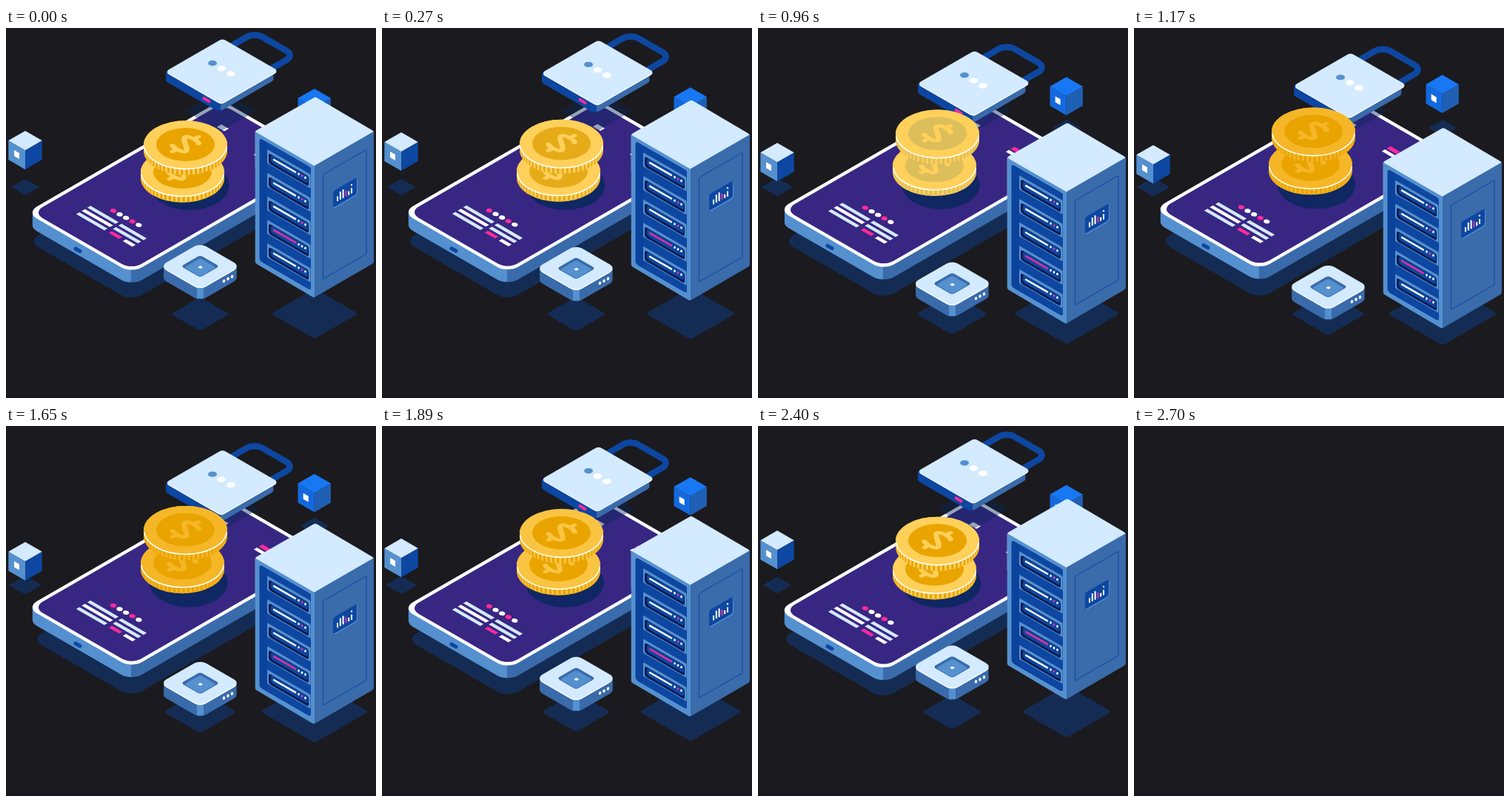
Write an HTML page with a canvas that moves like this. It is 500 by 500 pixels and loops after 2730 ms.

```html
<!DOCTYPE html>
<html lang="en">
<head>
<meta charset="utf-8">
<title>Isometric payment devices</title>
<style>
  html, body { margin: 0; width: 100%; height: 100%; overflow: hidden; background: #1b1a1e; }
  canvas { display: block; }
</style>
</head>
<body>
<canvas id="stage" width="500" height="500"></canvas>
<script>
const ctx = document.getElementById('stage').getContext('2d');
const LOOP = 2730, STEP = 30, SWING = 2700;
const COS = Math.cos(Math.PI / 6), SLOPE = Math.tan(Math.PI / 6);
const BG = '#1b1a1e', PALE = '#d3eaff', SKY = '#5590cf', STEEL = '#3a6bab', DEEP = '#0d47a1',
      NAVY = '#071b52', SHADE = '#142c54', PINK = '#f92c9c', PURPLE = '#382683', WHITE = '#fff';

const mix = (a, b, k) => a + (b - a) * k;
const clamp = v => Math.min(1, Math.max(0, v));
const wave = t => (1 - Math.cos(2 * Math.PI * t / SWING)) / 2;

function fill(color) {
  ctx.fillStyle = color;
  ctx.fill();
}

function stroke(color, width, cap = 'butt') {
  ctx.strokeStyle = color;
  ctx.lineWidth = width;
  ctx.lineCap = cap;
  ctx.stroke();
}

function line(x0, y0, x1, y1, color, width, cap) {
  ctx.beginPath();
  ctx.moveTo(x0, y0);
  ctx.lineTo(x1, y1);
  stroke(color, width, cap);
}

function oval(x, y, rx, ry, color, turn = 0) {
  ctx.beginPath();
  ctx.ellipse(x, y, rx, ry, turn, 0, 7);
  fill(color);
}

function lifted(dy, draw) {
  ctx.save();
  ctx.translate(0, dy);
  draw();
  ctx.restore();
}

// Rectangle lying on the ground plane; (x, y) is its left corner
function slabPath(x, y, w, h, r) {
  ctx.save();
  ctx.transform(COS, .5, COS, -.5, x, y);
  ctx.beginPath();
  ctx.roundRect(0, 0, w, h, r);
  ctx.restore();
}

function slab(x, y, w, h, r, color) {
  slabPath(x, y, w, h, r);
  fill(color);
}

// Square on the ground plane given by its centre and half width
const tile = (x, y, half, r, color) => slab(x - half, y, half / COS, half / COS, r, color);

// Upright rectangle; side 1 faces left (runs down), side -1 faces right (runs up)
function wallPath(x, y, w, h, r, side = 1) {
  ctx.save();
  ctx.transform(1, SLOPE * side, 0, 1, x, y);
  ctx.beginPath();
  ctx.roundRect(0, 0, w, h, r);
  ctx.restore();
}

function wall(x, y, w, h, r, color, side) {
  wallPath(x, y, w, h, r, side);
  fill(color);
}

function extrude(x, y, w, h, r, depth, split, left, right) {
  [[0, split, left], [split, 500, right]].forEach(([x0, x1, color]) => {
    ctx.save();
    ctx.beginPath();
    ctx.rect(x0, -100, x1 - x0, 700);
    ctx.clip();
    for (let d = depth; d >= 0; d--) slab(x, y + d, w, h, r, color);
    ctx.restore();
  });
}

// Bar of text running down-right
const bar = (x, y, length, color, thick = 5) =>
  slab(x - thick * COS / 2, y + thick / 4, length / COS, thick, 0, color);

function label() {
  for (let i = 0; i < 3; i++) {
    const x = 112 - 7.5 * i, y = 241.5 + 4.4 * i;
    const next = (dx, length, color) => bar(x + dx, y + dx * SLOPE, length, color);
    next(0, 38, i === 1 ? WHITE : PALE);
    if (i < 2) {
      next(42, 34, PALE);
    } else {
      next(44, 14, PINK);
      next(63, 13, WHITE);
    }
  }
  for (let i = 0; i < 5; i++)
    oval(145 + i * 8.6, 247 + i * 4.8, 4.2, 2.8, i % 3 ? WHITE : PINK, .15);
}

function phone() {
  const x = 27.7, y = 249.5, w = 164, h = 304, rim = 5;
  extrude(x, y, w, h, 16, 17, 169.5, SKY, STEEL);
  slab(x, y, w, h, 16, WHITE);
  slab(x + 2 * rim * COS, y, w - 2 * rim, h - 2 * rim, 15, PURPLE);
  line(94, 298.3, 100, 301.7, DEEP, 5, 'round');
  label();
  bar(288, 132, 10, WHITE, 7);
  bar(344, 166, 13, PINK, 6);
  bar(337, 170, 15, WHITE);
}

function lock() {
  slabPath(284, 36, 62, 60, 12);
  stroke(DEEP, 8.5);
  const x = 215.5, y = 59, w = 87, h = 89, r = 5;
  extrude(x - 3, y + 2, w, h, 7, 9, 290, DEEP, STEEL);
  slab(x, y + 1, w, h, r, WHITE);
  slab(x, y - .2, w, h, r, PALE);
  for (let i = 0; i < 3; i++) oval(279 + i * 12.4, 47.5 + i * 7.2, 6, 3.7, i ? WHITE : SKY);
  line(267.5, 95, 274.5, 99.2, PINK, 4, 'round');
}

// Letter S as part of a figure eight, with a tick at either end
function dollar(x, y, color) {
  ctx.save();
  ctx.transform(COS, .5, -COS, .5, x, y);
  ctx.beginPath();
  for (let u = -2.2; u <= 2.2; u += .1) ctx.lineTo(10 * Math.sin(2 * u), 13.5 * Math.sin(u));
  for (const s of [-1, 1]) {
    ctx.moveTo(0, 14 * s);
    ctx.lineTo(0, 20 * s);
  }
  stroke(color, 6, 'round');
  ctx.restore();
}

function coin(x, y, ring, core) {
  const rx = 56.5, ry = 32.7, depth = 8, ridge = Math.PI / 28;
  ctx.beginPath();
  ctx.ellipse(x, y + depth, rx, ry, 0, 0, Math.PI);
  ctx.ellipse(x, y, rx, ry, 0, Math.PI, 0);
  fill(ring);
  for (let a = ridge / 2; a < Math.PI; a += ridge) {
    ctx.beginPath();
    ctx.ellipse(x, y, rx, ry, 0, a, a + ridge / 2);
    ctx.ellipse(x, y + depth, rx, ry, 0, a + ridge / 2, a, true);
    fill(core);
  }
  oval(x, y, rx, ry, ring);
  ctx.beginPath();
  ctx.ellipse(x, y, rx - .5, ry - .2, 0, .08, Math.PI - .08);
  stroke(WHITE, 1.6);
  oval(x, y - .5, 39.5, 22.5, core);
  dollar(x, y - 1, ring);
}

// The gold fades to pale on the way up, then stays amber near the top
function gold(t) {
  const pale = clamp(t / 960) * clamp((1170 - t) / 210);
  const amber = clamp((t - 960) / 210) * clamp((2100 - t) / 450);
  const ring = `rgb(${mix(255, 245, amber)}, ${mix(208, 183, amber)}, ${mix(90, 40, amber)})`;
  const core = `rgb(${mix(233, 220, pale)}, ${mix(164, 190, pale)}, ${mix(0, 90, pale)})`;
  return [ring, core];
}

function cube(x, y, half, top, left, right) {
  const m = half * SLOPE;
  wall(x - half, y + m, half, 26, 0, left);
  wall(x, y + 2 * m, half, 26, 0, right, -1);
  tile(x, y + m, half, 0, top);
  wall(x - 15, y + 26, 7, 8, 0, WHITE);
}

function chip() {
  const x = 262.4, y = 322, half = 53.7;
  extrude(x - half, y, half / COS, half / COS, 9, 16, x, STEEL, STEEL);
  ctx.fillStyle = SKY;
  ctx.fillRect(258, 347, 9, 18.5);
  tile(x, y + 1, half, 9, WHITE);
  tile(x, y - .5, half, 9, PALE);
  tile(x, y, 26, 4, STEEL);
  tile(x, y + 1.5, 21.5, 3, SKY);
  tile(x + .3, y + 1.3, 3.5, 0, WHITE);
  for (let i = 0; i < 3; i++) oval(294.5 + i * 5.5, 342 - i * 3, 1.7, 2.3, WHITE, .3);
}

function rack(y, tone) {
  wall(353, y, 58.5, 19, 1, SKY);
  wall(355, y + 5, 54, 14, 3, NAVY);
  wall(358, y + 7.5, 50, 10, 3, DEEP);
  line(362, y + 14, 391, y + 30.7, tone, 2.4, 'round');
  for (let i = 0; i < 3; i++)
    oval(395.5 + i * 4.5, y + 33.3 + i * 2.5, 1.4, 1.7, i === 1 && tone !== PINK ? PINK : WHITE);
}

function server() {
  const left = 336.5, edge = 417, right = 497, top = 139.5, depth = 178;
  ctx.save();
  ctx.beginPath();
  const corners = [[left, top], [418, 93], [right, top], [right, top + depth],
                   [edge - 1, top + 47 + depth], [left, top + depth]];
  ctx.moveTo(left, top + 80);
  corners.forEach((c, i) => ctx.arcTo(...c, ...corners[(i + 1) % 6], 4));
  ctx.clip();
  ctx.fillStyle = PALE;
  ctx.fillRect(left, 90, right - left, 100);
  wall(left, top + .5, edge - left, 200, 0, SKY);
  wall(edge, top + 46.5, right - edge, 200, 0, STEEL, -1);
  ctx.restore();

  wall(342.5, 148.5, 69.5, 166, 4, '#0b429c');
  wall(353, 155, 59, 164, 0, DEEP);
  for (let i = 0; i < 5; i++) rack(164 + i * 31.7, i === 3 ? PINK : WHITE);

  wallPath(428.5, 198, 58.5, 141, 0, -1);
  stroke(DEEP, 1);
  wall(443, 221.5, 32, 22.5, 3, SKY, -1);
  wall(442, 220.5, 32, 22.5, 3, DEEP, -1);
  for (let i = 0; i < 6; i++) {
    const x = 448 + 3.8 * i, y = 234 - 2.1 * i;
    line(x, y, x, y - 8.5 - 3.5 * Math.sin(1.3 * i - .6), i === 3 ? PINK : WHITE, 2);
  }
  oval(467, 212, 1.2, 1.2, WHITE);
}

function shadows(k) {
  tile(26, 215, mix(19, 22.5, k), 1, SHADE);
  const inset = mix(1, 4, k);
  slab(27.7 + 2 * COS * inset, 288, 164 - 2 * inset, 304 - 2 * inset, 16, SHADE);
  tile(417, 135, 19, 1, SHADE);
  tile(417, 386, mix(59, 75, k), 4, SHADE);
  tile(262.3, 386.5, mix(39.5, 50.5, k), 4, SHADE);
}

function draw(t) {
  ctx.fillStyle = BG;
  ctx.fillRect(0, 0, 500, 500);
  ctx.fillStyle = '#18171d';
  ctx.fillRect(0, 496, 500, 4);
  if (t >= SWING) return;

  const k = wave(t), [ring, core] = gold(t);
  shadows(k);
  lifted(20 * k, () => cube(26, 139, 22.7, PALE, SKY, DEEP));
  lifted(-5 * k, phone);
  tile(290, 112, mix(48, 53, k), 4, 'rgba(8, 38, 92, .42)');
  oval(mix(248, 246.5, k), mix(213, 211.5, k), mix(53.5, 52.5, k), 33, '#0f2762');
  lifted(20 * k, lock);
  coin(238.5, 195 - 10.8 * k, ring, core);
  coin(242.5, 158 - 19 * wave(t - STEP), ring, core);
  lifted(-19.5 * k, () => cube(416.7, 82, 22.2, '#1877f2', '#1468de', '#1f5fb3'));
  lifted(29 * k, chip);
  lifted(43.5 * k, server);
}

function tick() {
  const t = performance.now() % LOOP;
  draw(Math.floor(t / STEP) * STEP);
  requestAnimationFrame(tick);
}
tick();
</script>
</body>
</html>
```
